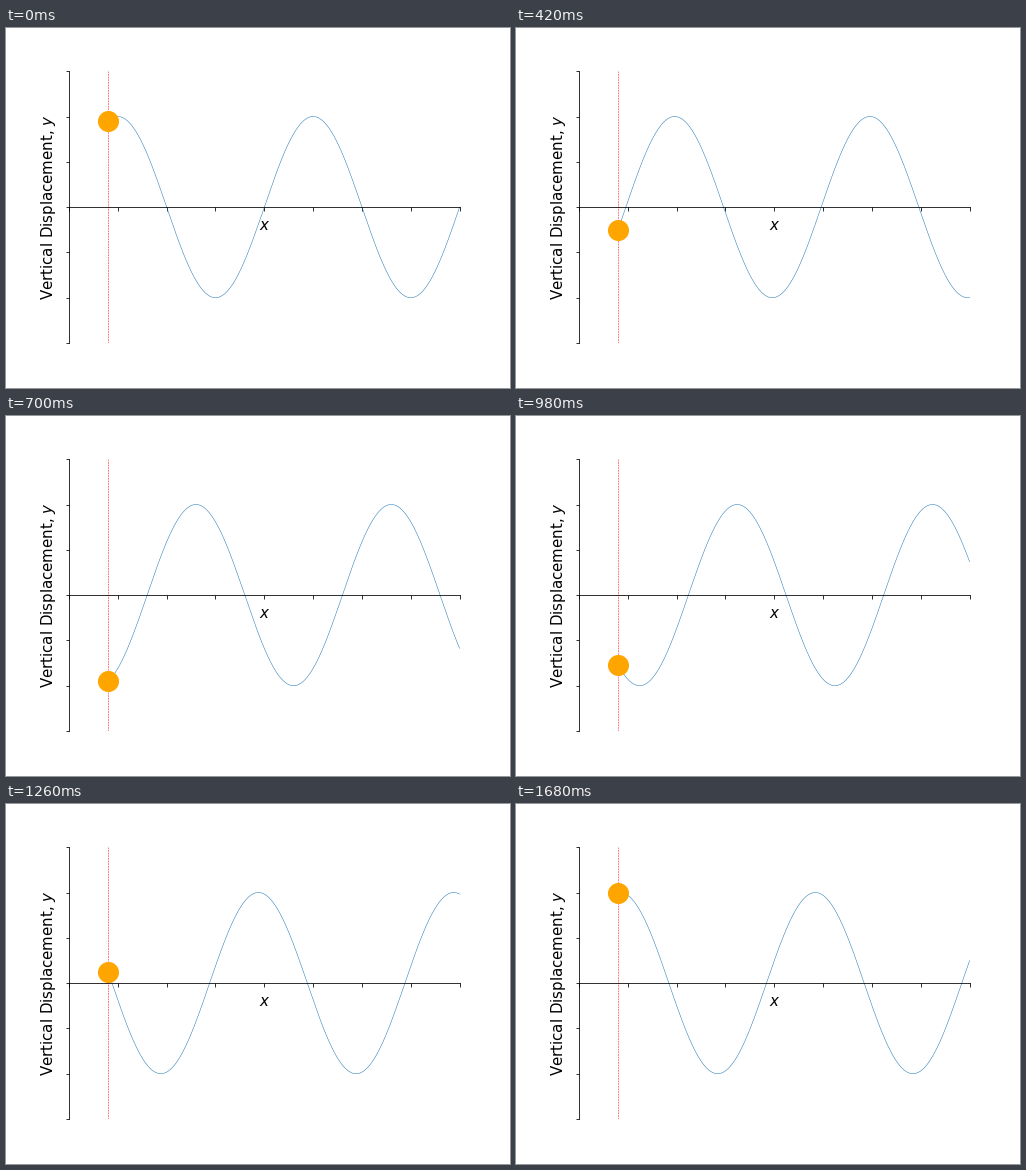
Write a matplotlib script that moves like this. It is 504 px wide and 360 px high and loops after 1750 ms.

```python
import numpy as np
import matplotlib.pyplot as plt
from matplotlib.animation import FuncAnimation

FRAMES = 25
INTERVAL = 70
START = 100  # sample where the string is held by the ball
WAVELENGTH = 2.0

xs = np.linspace(0, 4, 1000)[START:]


def wave(frame):
    """Travelling sine wave that moves one wavelength per loop."""
    return np.sin(2 * np.pi * (xs / WAVELENGTH - frame / FRAMES))


fig, ax = plt.subplots(figsize=(7, 5), dpi=72)
fig.subplots_adjust(left=0.125, right=0.9, bottom=0.125, top=0.88)
ax.set(xlim=(0, 4), ylim=(-1.5, 1.5))
ax.set_xticks(np.arange(0, 4.1, 0.5), labels=[])
ax.set_yticks(np.arange(-1.5, 1.6, 0.5), labels=[])
ax.spines["bottom"].set_position("center")
ax.spines[["top", "right"]].set_visible(False)
ax.set_xlabel("$x$", fontsize=15)
ax.set_ylabel("Vertical Displacement, $y$", fontsize=15)

ax.axvline(xs[0], color="red", lw=0.5, ls="--")
curve, = ax.plot([], [], color="tab:blue", lw=0.5)
ball, = ax.plot([], [], "o", color="orange", ms=20)


def update(frame):
    ys = wave(frame)
    curve.set_data(xs, ys)
    ball.set_data(xs[:1], ys[:1])
    return curve, ball


anim = FuncAnimation(fig, update, frames=FRAMES, interval=INTERVAL, repeat=True)
plt.show()
```
